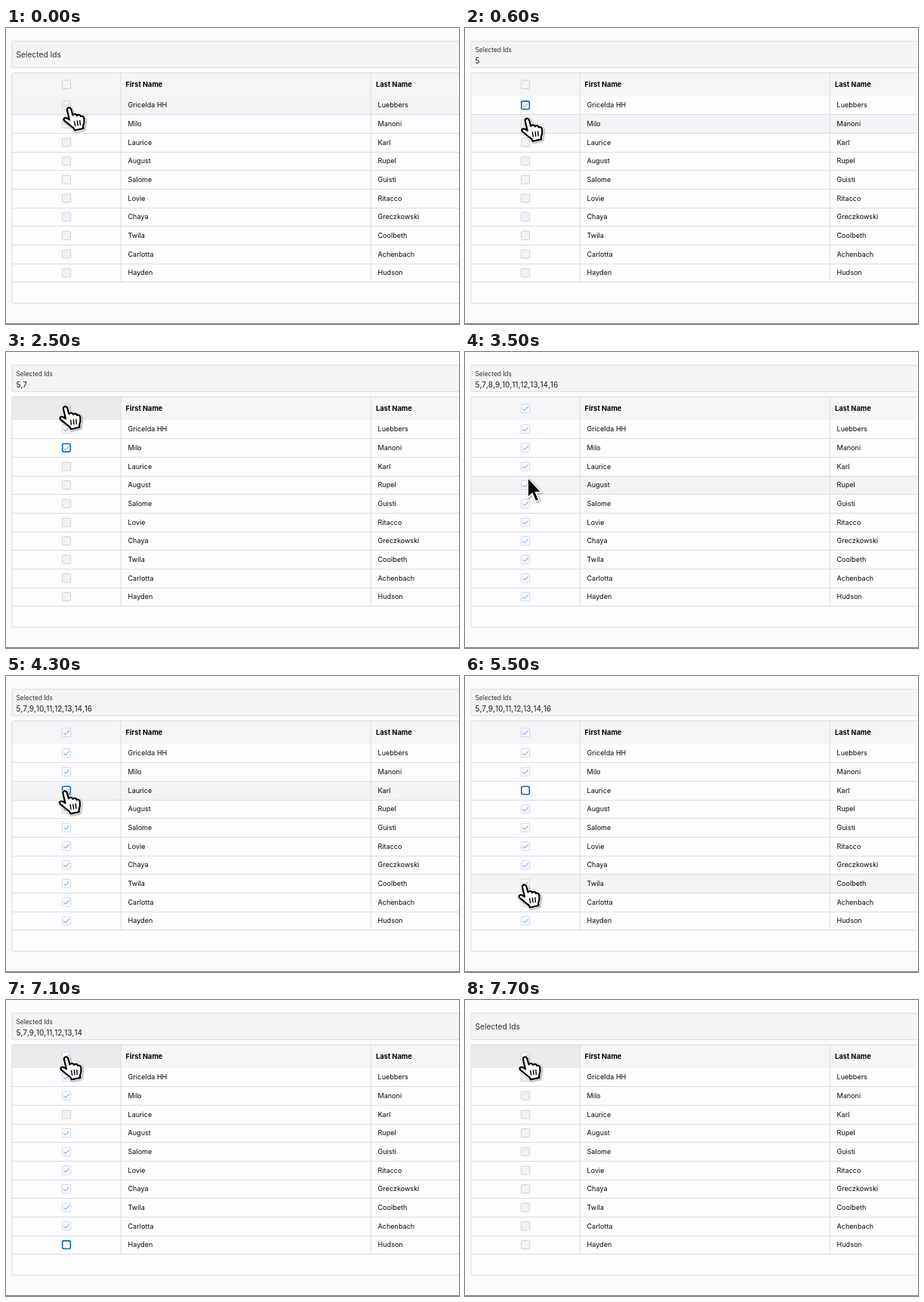
Write an HTML page that moves like this. It is 600 px wide and 392 px high and loops after 8100 ms.

```html
<!DOCTYPE html>
<html lang="en">
<head>
<meta charset="utf-8">
<title>Row selection</title>
<style>
  html, body { margin: 0; width: 100%; height: 100%; overflow: hidden; background: #fbfafc; }
  svg { display: block; font-family: Inter, "Open Sans", sans-serif; }
  .cell { font-size: 9px; letter-spacing: .04px; fill: #050505; }
  .head { font-size: 9.25px; font-weight: 700; fill: #000; }
  .value { font-size: 10px; font-kerning: none; fill: #1c1c1c; }
  .line { stroke: #dddce0; fill: none; }
  .pointer { filter: drop-shadow(1px 1.5px 1px #0006); }
</style>
</head>
<body>
<svg id="stage" width="600" height="392" viewBox="0 0 600 392"></svg>
<script>
const LOOP = 8100, STEP = 100, TOP = 90, ROW = 24.67, BOX_X = 80, HEAD_Y = 74.8;
const people = [
  ['Gricelda HH', 'Luebbers'], ['Milo', 'Manoni'], ['Laurice', 'Karl'],
  ['August', 'Rupel'], ['Salome', 'Guisti'], ['Lovie', 'Ritacco'],
  ['Chaya', 'Greczkowski'], ['Twila', 'Coolbeth'], ['Carlotta', 'Achenbach'],
  ['Hayden', 'Hudson']
];
// Ids run on from 5, skipping 6 and 15
const ids = people.map((_, i) => 5 + i + (i > 0) + (i > 8));

// Clicks: time and row, -1 is the header box
const clicks = [[200, 0], [1200, 1], [2700, -1], [4100, 2], [5900, 9], [7500, -1]];

// Pointer moves: leave, arrive, height in rows, offset from the boxes
const start = [0.65, 4];
const moves = [
  [300, 800, 1.55, 2], [1200, 1400, 2.25, 7], [1500, 2200, -0.7, -1],
  [2800, 3500, 3.08, 3], [3500, 3900, 2.55, -1.5], [4900, 5000, 5.2, 10],
  [5100, 5500, 7.58, -1], [5500, 5700, 9.5, -1], [5900, 6500, 1.62, -13],
  [6500, 7100, -0.57, 0]
];

const clamp = p => Math.max(0, Math.min(1, p));
const ease = p => p * p * (3 - 2 * p);
const rowY = i => TOP + ROW * (i + 0.5);
const text = (x, y, cls, str) => `<text x="${x}" y="${y}" class="${cls}">${str}</text>`;
const rect = (x, y, w, h, attrs) => `<rect x="${x}" y="${y}" width="${w}" height="${h}" ${attrs}/>`;
const line = d => `<path class="line" d="${d}"/>`;

function pointerAt(t) {
  let [row, dx] = start;
  for (const [leave, arrive, toRow, toDx] of moves) {
    const p = ease(clamp((t - leave) / (arrive - leave)));
    row += (toRow - row) * p;
    dx += (toDx - dx) * p;
  }
  return { x: BOX_X + dx, y: TOP + ROW * row };
}

function selectionAt(t) {
  const on = ids.map(() => false);
  let all = false, focus = -1;
  for (const [time, row] of clicks) {
    if (time > t) break;
    if (row < 0) on.fill(all = !all);
    else on[row] = !on[row];
    focus = row;
  }
  return { on, all, focus };
}

function checkbox(y, on, focused, hovered) {
  const border = focused ? '#1b61b8' : on ? '#cad4e0' : '#cfced2';
  const fill = on || focused ? '#fdfdff' : '#f3f2f4';
  const mark = on ? '#4f8ed6' : hovered ? '#b9b8bd' : 'none';
  const r = focused ? 5.3 : 5.6;
  return rect(BOX_X - r, y - r, 2 * r, 2 * r,
      `rx="${focused ? 2 : 1}" fill="${fill}" stroke="${border}" stroke-width="${focused ? 1.6 : 0.9}"`) +
    `<path d="M${BOX_X - 3.7} ${y + 0.2}l2.6 2.5 4.9-5.4" fill="none" stroke="${mark}"/>`;
}

function arrow() {
  return `<path d="M0 0V27L6 21.5 10.5 32 15 30 10.7 20H18.3Z" stroke="#fff" stroke-width="1.8"/>`;
}

function hand() {
  const d = 'M-3 3C-3.8-1 1.2-1.8 2.3 1.5L4.5 9.5C6 7 9.5 7.5 10 10 12 8 14.5 8.8 15 11' +
    ' 17.5 9.8 19.2 11.5 19.4 14 20 18 19.5 21 18 24.5L18.5 27 7 29.5 5.5 26.5' +
    'C1.5 24-2 20-6.5 17-9 14-6 11.8-3 13.5L0 15.5Z';
  return `<g fill="#fff" stroke-linejoin="round">
    <path d="${d}" stroke="#fff" stroke-width="3.8"/>
    <path d="${d}" stroke="#000" stroke-width="2.2"/>
    <path d="M6.5 17l1.2 7M10.3 16.5l.8 7M13.8 16l.6 7" stroke="#000" stroke-width="1.4"/></g>`;
}

// 0 is the resting label, 1 the raised one
function labelLift(t) {
  const since = start => clamp((t - start + STEP) / 300);
  return t < clicks[0][0] ? 0 : since(200) - (t < 7500 ? 0 : since(7500));
}

function draw(t) {
  const { x, y } = pointerAt(t), { on, all, focus } = selectionAt(t);
  const hover = y < TOP ? -1 : Math.floor((y - TOP) / ROW);
  const boxY = hover < 0 ? HEAD_Y : rowY(hover);
  const over = Math.abs(x - BOX_X) < 7 && Math.abs(y - boxY) < 7;
  const lift = labelLift(t);

  let out = rect(0, 0, 600, 392, 'fill="#fbfafc"') +
    rect(8, 17.5, 610, 35, 'rx="1.5" fill="#f5f4f6" stroke="#dddce0"') +
    `<text x="13.5" y="${39 - 7.4 * lift}" font-size="${10.2 - 1.9 * lift}" fill="#2c2c2c">Selected Ids</text>` +
    text(13.5, 46.6, 'value', ids.filter((_, i) => on[i]).join()) +
    rect(8, 59.5, 610, 305, 'rx="1.5" fill="#fdfcfe"') +
    rect(8, 60, 592, 30, 'fill="#f6f5f7"');

  if (hover < 0) out += rect(8, 60, 144, 30, 'fill="#ebeaec"');
  else out += rect(8, TOP + ROW * hover, 592, ROW, 'fill="#f4f3f5"');

  out += text(158.5, 78.3, 'head', 'First Name') + text(490, 78.3, 'head', 'Last Name') +
    checkbox(HEAD_Y, all, false, over && hover < 0);

  people.forEach(([first, last], i) => {
    const mid = rowY(i);
    out += line(`M8 ${Math.floor(TOP + ROW * (i + 1)) + 0.5}H600`) +
      text(161.5, mid + 3.1, 'cell', first) + text(492.5, mid + 3.1, 'cell', last) +
      checkbox(mid - 0.2, on[i], focus === i, over && hover === i);
  });

  out += line('M152.2 60V336.5M483.2 60V336.5') +
    rect(8, 59.5, 610, 305, 'rx="1.5" class="line"') +
    rect(0, 391, 600, 1, 'fill="#77767a"') +
    `<g class="pointer" transform="translate(${x} ${y})">${over ? hand() : arrow()}</g>`;
  stage.innerHTML = out;
}

const stage = document.getElementById('stage');
let shown = -1;
function tick() {
  const t = Math.floor(performance.now() % LOOP / STEP) * STEP;
  if (t !== shown) draw(shown = t);
  requestAnimationFrame(tick);
}
tick();
</script>
</body>
</html>
```
